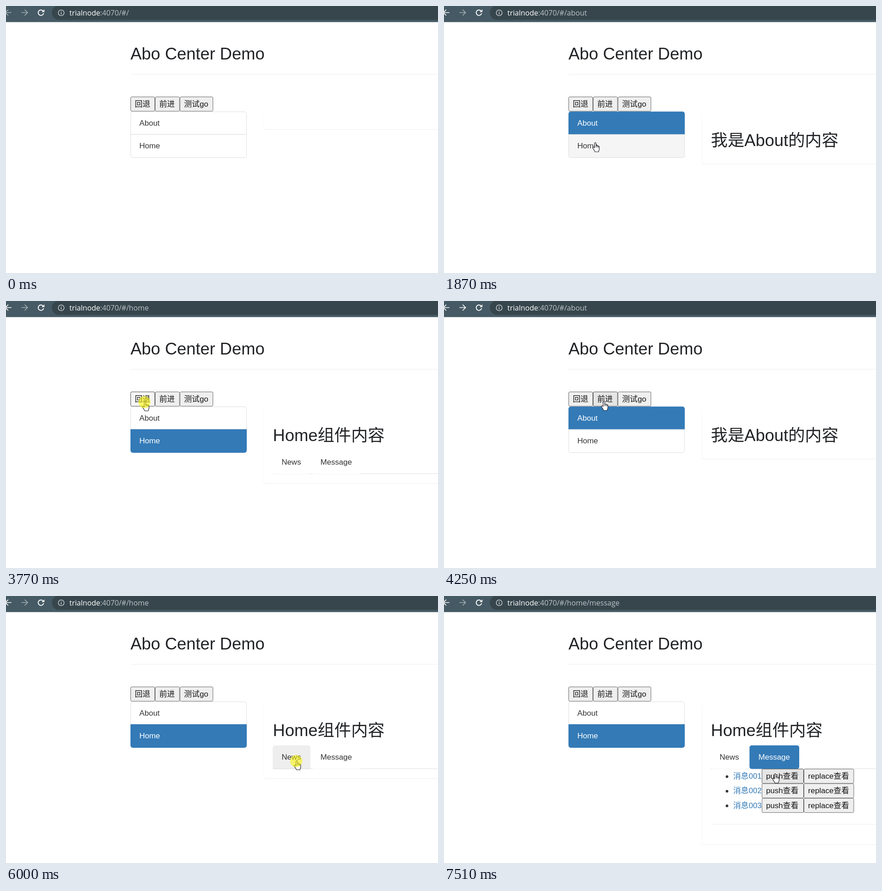
An HTML page for the animation above (8 s loop, 951 px wide and 589 px high).

```html
<!DOCTYPE html>
<html lang="zh-CN">
<head>
<meta charset="utf-8">
<title>Router demo</title>
<style>
  html, body { margin: 0; width: 100%; height: 100%; overflow: hidden; background: #fff; }
  svg { display: block; width: 100vw; height: 100vh; }
  text { font: 17.1px "Liberation Sans", "Noto Sans CJK SC", "Noto Sans CJK", sans-serif; fill: #333; white-space: pre; }
  .title { font-size: 36.9px; fill: #212326; }
  .url { font: 16.1px "Open Sans", "Noto Sans", sans-serif; fill: #bcc4c8; }
  .host { fill: #fff; }
  .active { fill: #fff; }
  .button { fill: #161616; }
  .link { fill: #337ab7; }
</style>
</head>
<body>
<svg id="stage" viewBox="0 0 951 589"></svg>
<script>
const LOOP = 8000, BLUE = '#337ab7';
const stage = document.getElementById('stage');

// [time, value]: each value holds until the next time
const views = [[0, ''], [1460, 'about'], [2400, 'home'], [3840, 'about'], [4660, 'home'], [6070, 'news'], [6900, 'message']];
const paths = [[0, ''], [1530, 'about'], [2480, 'home'], [3840, 'about'], [4730, 'home'], [6070, 'home/news'], [6970, 'home/message']];
const canGoForward = [[0, false], [3840, true], [4730, false]];
const presses = [1390, 2330, 3770, 4590, 6000, 6830];
const PRESS_LENGTH = 70;

// [start, end, x, y]: pointer moves
const moves = [
  [1460, 1940, 332, 304], [2820, 3310, 306, 222], [3980, 4250, 352, 221],
  [4930, 5540, 640, 363], [6150, 6630, 708, 363], [7240, 7510, 729, 392]
];

const valueAt = (steps, t) => steps.filter(([start]) => start <= t).pop()[1];
const ease = p => p * p * (3 - 2 * p);

function pointerAt(t) {
  if (t < 330) return { x: -99, y: -99 };
  let x = 778, y = 529;
  for (const [start, end, toX, toY] of [[330, 1180, 350, 255], ...moves]) {
    const p = ease(Math.min(1, Math.max(0, (t - start) / (end - start))));
    x += (toX - x) * p;
    y += (toY - y) * p;
  }
  return { x, y };
}

const text = (x, y, content, cls = '') => `<text x="${x}" y="${y}" class="${cls}">${content}</text>`;
const rect = (x, y, w, h, fill, r = 0, stroke = 'none') =>
  `<rect x="${x}" y="${y}" width="${w}" height="${h}" rx="${r}" fill="${fill}" stroke="${stroke}"/>`;
const path = (d, stroke, width = 1, fill = 'none') =>
  `<path d="${d}" stroke="${stroke}" stroke-width="${width}" fill="${fill}"/>`;

function browserBar(route, forward) {
  const arrowColor = on => on ? '#fff' : '#a3adb2';
  return rect(0, 0, 951, 35.5, '#455a64') + rect(101, -1, 900, 31.5, '#37464d', 15.7) +
    path('M12 14.5H-1M5 8L-1.5 14.5 5 21', arrowColor(route), 1.7) +
    path('M34 14.5H47M41 8L47.5 14.5 41 21', arrowColor(forward), 1.7) +
    path('M82 11.5A6 6 0 1 0 82.8 16', '#fff', 1.9) + path('M84.5 7.5V13.5H78.5Z', 'none', 0, '#fff') +
    `<circle cx="121.5" cy="15" r="6.4" fill="none" stroke="#d2d8da" stroke-width="1.4"/>` +
    path('M121.5 14V18.5M121.5 11.2V12.8', '#d2d8da', 1.5) +
    text(139.5, 20.5, 'trialnode', 'url host') + text(207.3, 20.5, ':4070/#/' + route, 'url');
}

function scene(t) {
  const view = valueAt(views, t);
  const pointer = pointerAt(t);
  const pressed = presses.some(start => t >= start && t < start + PRESS_LENGTH);
  let hand = false;

  const hover = (x, y, w, h) => {
    const inside = pointer.x >= x && pointer.x < x + w && pointer.y >= y && pointer.y < y + h;
    hand = hand || inside;
    return inside;
  };

  const button = (x, y, w, h, label, baseline) => {
    const over = hover(x, y, w, h);
    const fill = over ? (pressed ? '#f5f5f5' : '#e5e5e5') : '#efefef';
    return rect(x + .5, y + .5, w - 1, h - 1, fill, 2.5, over ? '#4f4f4f' : '#666') +
      text(x + 9.5, baseline, label, 'button');
  };

  const listItem = (y, h, label, baseline, active, shape) => {
    const over = hover(274, y, 256, h);
    return path(shape, active ? BLUE : '#ddd', 1, active ? BLUE : over ? '#f5f5f5' : '#fff') +
      text(293.5, baseline, label, active ? 'active' : '');
  };

  const tab = (x, w, label, active) => {
    const over = hover(x, 330, w, 51);
    return rect(x, 329.5, w, 52, active ? BLUE : over ? '#eee' : '#fff', 5) +
      (over && !active ? path(`M${x} 381H${x + w}`, '#ddd') : '') +
      text(x + 19.7, 361, label, active ? 'active' : '');
  };

  const bullet = y => `<circle cx="623" cy="${y}" r="2.9" fill="#333"/>`;
  const inHome = ['home', 'news', 'message'].includes(view);
  const panelBottom = { '': 272, about: 348, home: 402, news: 488, message: 548 }[view];

  let out = browserBar(valueAt(paths, t), valueAt(canGoForward, t)) +
    text(274, 117.7, 'Abo Center Demo', 'title') + path('M274 150.5H951', '#eee') +
    button(274, 200, 54, 32.6, '回退', 222) +
    button(328, 200, 54.5, 32.6, '前进', 222) +
    button(382.5, 200, 73.5, 32.6, '测试go', 222) +
    listItem(233, 50, 'About', 264, view === 'about',
      'M274.5 283.3V238.3q0-5 5-5H524.5q5 0 5 5V283.3Z') +
    listItem(283, 52, 'Home', 314.3, inHome,
      'M274.5 283.3H529.5V329.3q0 5-5 5H279.5q-5 0-5-5Z') +
    path(`M567.5 240V${panelBottom - 4.5}`, '#f8f8f8') +
    path(`M567.5 ${panelBottom - 4.5}q0 5 5 5H951`, '#eee');

  if (view === 'about') out += text(587.5, 309, '我是About的内容', 'title');
  if (inHome) {
    out += text(587.5, 309, 'Home组件内容', 'title') + path('M587.5 381H951', '#ddd') +
      tab(587, 83, 'News', view === 'news') + tab(672.5, 109.5, 'Message', view === 'message');
  }
  if (view === 'news') {
    for (let i = 0; i < 3; i++) {
      const y = 400 + i * 24.5;
      out += bullet(y - 4.5) + text(636.5, y, 'news00' + (i + 1));
    }
  }
  if (view === 'message') {
    for (let i = 0; i < 3; i++) {
      const y = 381.2 + i * 32.2;
      out += bullet(y + 17.3) + text(636.5, y + 22, '消息00' + (i + 1), 'link') +
        button(699.5, y, 92.5, 32.6, 'push查看', y + 22) + button(792, y, 110.5, 32.6, 'replace查看', y + 22);
    }
    out += path('M587.5 503.5H951', '#eee');
  }

  const cursor = hand
    ? path('M-1.6 11.5V1.7a1.6 1.6 0 0 1 3.2 0V7c.5-1 2.6-.9 2.8.4c.7-.7 2.3-.5 2.5.7c.8-.4 1.9 0 1.9 1.2V14c0 2.5-1.3 3.5-1.7 6.5H-.5C-1 18-4.5 14.5-5.6 11.8c-.6-1.6 1.2-2.2 2.2-1.2z', '#26262e', 1.2, '#fff') +
      path('M1.6 6.5V11M4.4 7.4V11M6.9 8.2V11.5', '#26262e')
    : path('M0 0V17l3.9-3.7 2.6 6 2.7-1.2-2.5-5.8H12z', '#222', 1, '#fff');
  const glow = pressed ? '<circle cx="-1.3" cy="1" r="13.3" fill="#fbf600" opacity=".56"/>' : '';
  return out + `<g transform="translate(${pointer.x} ${pointer.y})">${cursor}${glow}</g>`;
}

function draw() {
  stage.innerHTML = scene(performance.now() % LOOP);
  requestAnimationFrame(draw);
}
draw();
</script>
</body>
</html>
```
